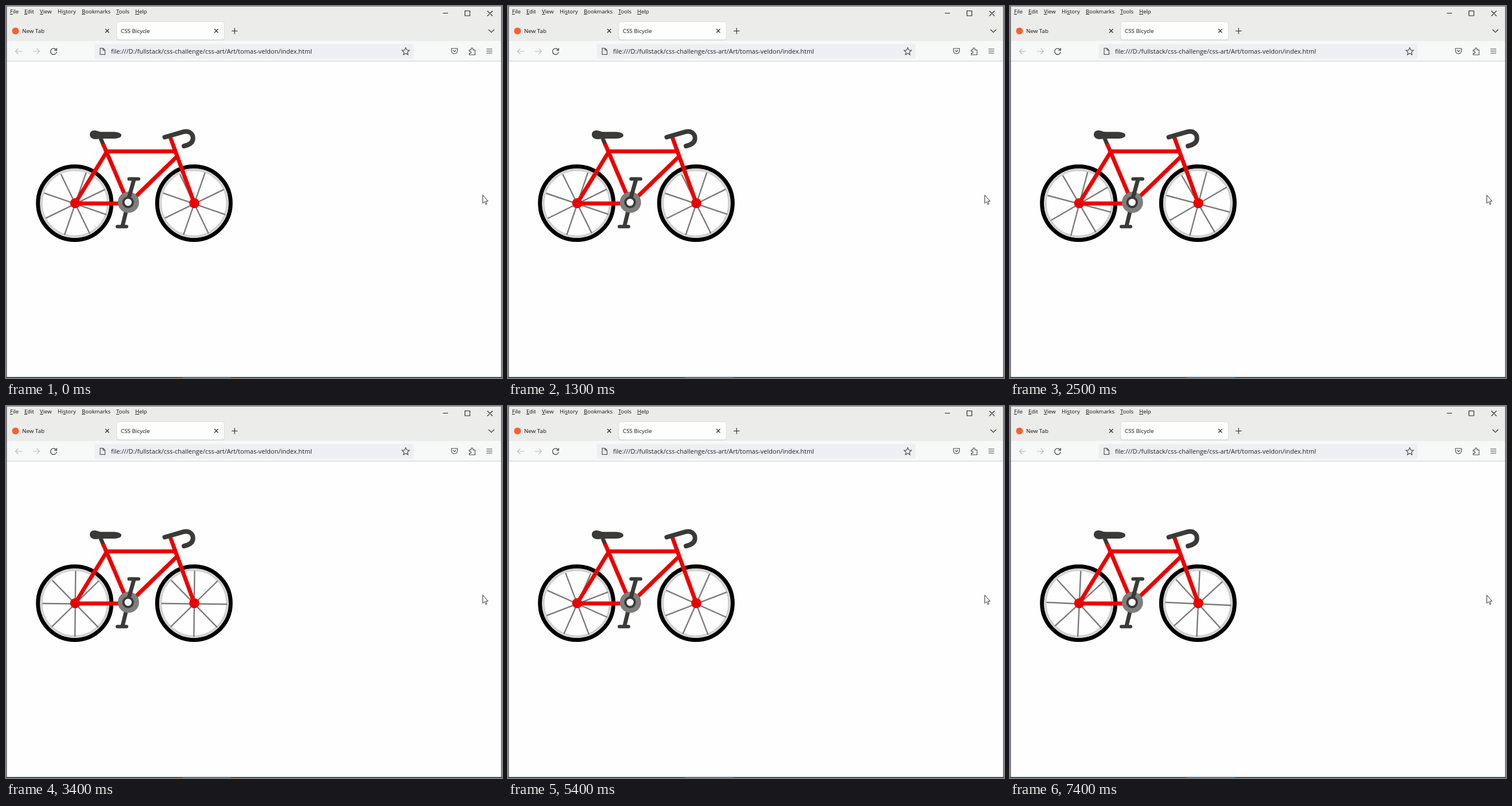
An HTML page for the animation above (7.5 s loop, 864 by 648 pixels).

```html
<!DOCTYPE html>
<html lang="en">
<head>
<meta charset="utf-8">
<title>CSS Bicycle</title>
<style>
  html, body { margin: 0; width: 100%; height: 100%; overflow: hidden; background: #fdfefd; }
  svg { display: block; width: 864px; height: 648px; }
  text { font-family: "Open Sans", "Noto Sans", sans-serif; fill: #111; white-space: pre; }
  .menu { font-size: 9.5px; }
  .tab { font-size: 9.8px; }
  .url { font-size: 11px; fill: #222; }
  .u { text-decoration: underline; }
  .icon { fill: none; stroke: #444; stroke-width: 1.1; }
  .off { stroke: #b9b9b9; }
  .frame { fill: none; stroke: #eb0000; stroke-width: 7; }
  .dark { fill: none; stroke: #3a3a39; stroke-width: 7; }
  .round { stroke-linecap: round; }
  .spokes { stroke: #7b7b7b; stroke-width: 2.4; }
</style>
</head>
<body>
<svg viewBox="0 0 864 648">
  <rect width="864" height="648" fill="#fdfefd"/>

  <!-- browser window -->
  <rect width="864" height="61" fill="#ecedeb"/>
  <rect y="61" width="864" height="35" fill="#f7f9f8"/>
  <rect y="95.5" width="864" height="1" fill="#c9cac9"/>
  <g id="menu" class="menu"></g>

  <rect x="192.5" y="27.5" width="188" height="32" rx="3.5" fill="#d3d4d3"/>
  <rect x="193.2" y="28" width="186.6" height="30.3" rx="3" fill="#fdfefd"/>
  <circle cx="16.5" cy="43.5" r="6" fill="#f5622f"/>
  <text class="tab" x="28" y="47">New Tab</text>
  <text class="tab" x="200" y="47">CSS Bicycle</text>
  <g class="icon" style="stroke:#222">
    <path d="M173 40l6.5 6.5m0-6.5l-6.5 6.5M363 40l6.5 6.5m0-6.5l-6.5 6.5"/>
    <path d="M393 43.5h10.5M398.2 38.3v10.5"/>
    <path d="M840.5 41l5 4.8 5-4.8"/>
    <path d="M761 12.5h9M799.5 8.5h8.5v8.5h-8.5zM838.5 8.5l9 9m0-9l-9 9"/>
  </g>

  <rect x="154.5" y="66" width="555.5" height="26" rx="3.5" fill="#eeeff2"/>
  <text class="url" x="183" y="83">file:///D:/fullstack/css-challenge/css-art/Art/tomas-veldon/index.html</text>
  <g class="icon">
    <path class="off" d="M28 79H16.500m4.800-4.800l-4.800 4.800 4.800 4.800M47 79h11.500m-4.800-4.800l4.800 4.800-4.800 4.800"/>
    <path d="M87 75.800a5.300 5.300 0 1 0 1.200 4M88.300 73.200v3.800h-3.800" stroke-width="1.300"/>
    <path d="M164 73.500h5l3.500 3.500v7.500h-8.500zM169 73.500v3.500h3.500"/>
    <path d="M696.300 72.500l1.900 4.200 4.600.5-3.400 3.100.9 4.500-4-2.300-4 2.300.9-4.500-3.400-3.100 4.600-.5z"/>
    <path d="M776 74h10.500v4a5.200 5.200 0 0 1-10.500 0zM778.600 77l2.700 2.500 2.700-2.500"/>
    <path d="M807 76.500h3v-1.700a1.700 1.700 0 0 1 3.400 0v1.700h3.600v8.500H807v-2.600h1.500a1.700 1.700 0 0 0 0-3.400H807z"/>
    <path d="M837 75h10M837 78.500h10M837 82h10"/>
  </g>

  <!-- bicycle -->
  <g id="wheels"></g>
  <path class="dark" d="M164.500 229.500L170.500 244"/>
  <path class="dark" d="M213 342L203 383"/>
  <g class="frame">
    <path d="M174 253.200H298"/>
    <path d="M169 240L212.500 342"/>
    <path d="M120.500 343.500L175.500 254"/>
    <path d="M120.500 344H212"/>
    <path d="M298 262L214 343.500"/>
    <path d="M286.300 229L328 343.500"/>
  </g>
  <g fill="#eb0000">
    <circle cx="120.500" cy="343.500" r="8.800"/>
    <circle cx="328" cy="343.500" r="8.800"/>
  </g>
  <circle cx="213.300" cy="342" r="18.500" fill="#7e7e7d"/>
  <path class="dark" d="M223 302L213.500 336"/>
  <circle cx="212.700" cy="342" r="8.200" class="dark" style="fill:#fdfefd;stroke-width:4"/>
  <path class="dark round" style="stroke-width:6" d="M214.300 301.300H231M194 384.200H210"/>
  <path fill="#3a3a39" d="M146 224C146 219 150 216.500 155 216.800C159 217 162 219.500 167 219.300H186C195 219.300 201 221.500 201 225.200C201 229 195 231 186 231H165C161 231 159 232.300 155 232C150 231.500 146 229 146 224Z"/>
  <path class="dark round" style="stroke-width:8" d="M276.500 228.500L309 219.200C319 216.500 326 222.500 325.700 231C325.300 238.500 319 242 310 244"/>

  <path d="M830.500 329.500v14.200l3.100-2.900 2.300 4.900 2-.9-2.200-4.800h4.200z" fill="#fdfefd" stroke="#333" stroke-width="1"/>

  <!-- window edges -->
  <rect width="864" height="1" fill="#777a7b"/>
  <rect width="1.500" height="648" fill="#5c5f64"/>
  <rect x="862.500" width="1.500" height="648" fill="#5c5f64"/>
  <rect y="646.300" width="864" height="1.700" fill="#2c3b48"/>
  <rect x="308" y="646.300" width="84" height="1.700" fill="#2b80c4"/>
</svg>
<script>
  const LOOP = 7500, STEP = 100;
  const START = 19.15, SPEED = 34.25; // degrees, degrees per second

  // label, x, index of the underlined letter
  const menu = [
    ["File", 7, 0], ["Edit", 32, 0], ["View", 59, 0], ["History", 90, 2],
    ["Bookmarks", 132, 0], ["Tools", 192, 0], ["Help", 225, 0]
  ];
  document.getElementById("menu").innerHTML = menu.map(([label, x, i]) =>
    `<text x="${x}" y="13">${label.slice(0, i)}<tspan class="u">${label[i]}</tspan>${label.slice(i + 1)}</text>`
  ).join("");

  const spokeLines = [0, 45, 90, 135].map(a =>
    `<path d="M-57.300 0H57.300" transform="rotate(${a})"/>`).join("");

  const wheel = (x, hubX) => `
    <circle cx="${x}" cy="343.500" r="64" fill="none" stroke="#000" stroke-width="7"/>
    <circle cx="${x}" cy="343.500" r="58" fill="none" stroke="#d2d1d0" stroke-width="4"/>
    <g transform="translate(${hubX} 344.600)"><g class="spokes">${spokeLines}</g></g>`;

  document.getElementById("wheels").innerHTML = wheel(119.7, 120.7) + wheel(327.3, 327.9);
  const spokes = document.querySelectorAll(".spokes");

  const begin = performance.now();
  function draw(now) {
    const time = Math.max(0, now - begin) % LOOP;
    const seconds = Math.floor(time / STEP) * STEP / 1000;
    const angle = START + SPEED * seconds;
    spokes.forEach(s => s.setAttribute("transform", `rotate(${angle})`));
    requestAnimationFrame(draw);
  }
  draw(begin);
</script>
</body>
</html>
```
